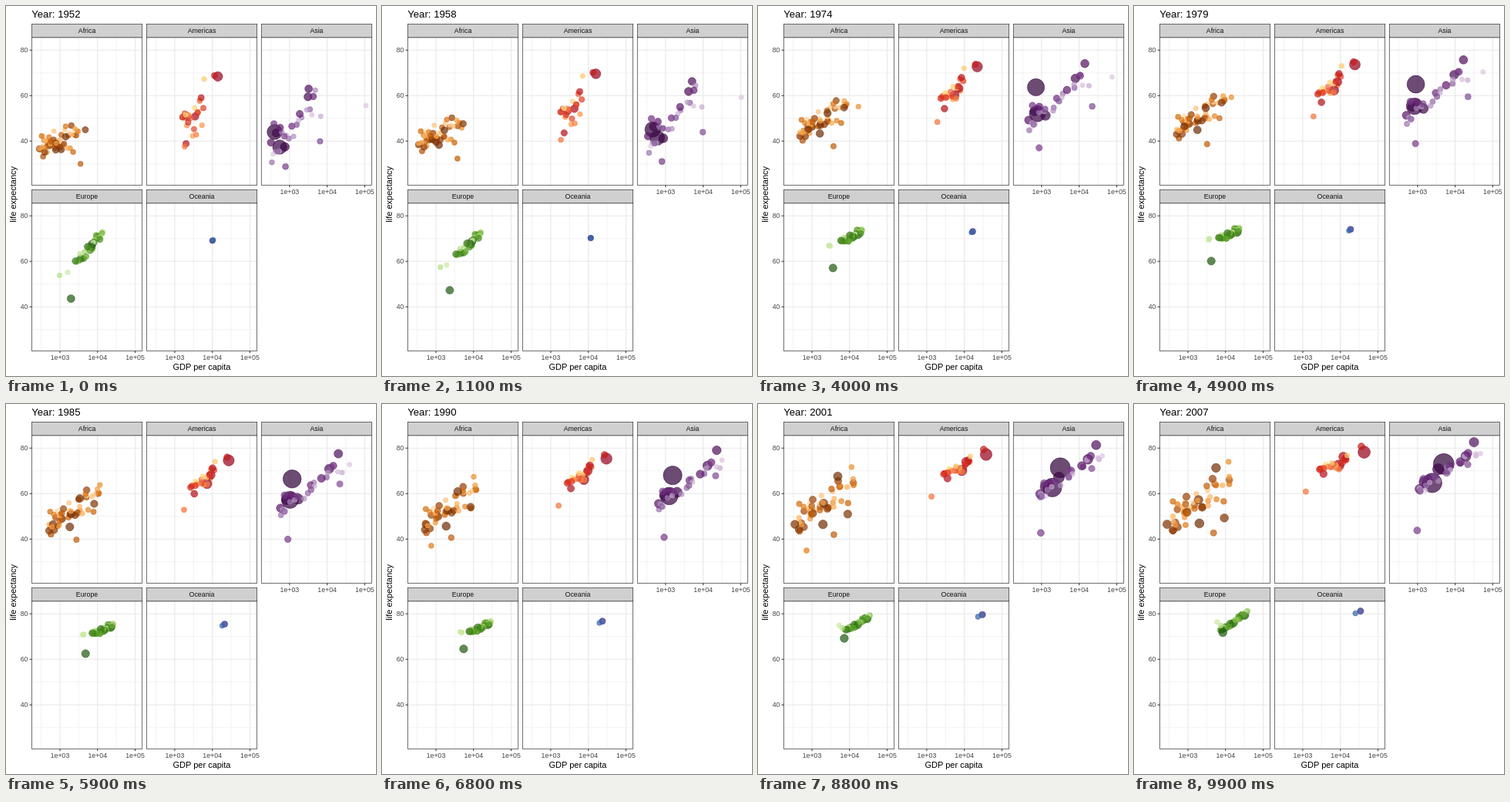
An HTML page for the animation above (10 s loop, 480 by 480 pixels).

```html
<!DOCTYPE html>
<html lang="en">
<head>
<meta charset="utf-8">
<title>Life expectancy and GDP</title>
<style>
  html, body { margin: 0; width: 100%; height: 100%; overflow: hidden; background: #fff; }
  svg { display: block; width: 480px; height: 480px; font-family: "Liberation Sans", Arial, sans-serif; }
</style>
</head>
<body>
<svg id="stage" viewBox="0 0 480 480"></svg>
<script>
const stage = document.getElementById('stage');
const LOOP = 10000, STEP = 100, FIRST = 1952, SPAN = 55;
const LEFT = 33.4, TOP = 40.8, W = 143.3, H = 191.6, DX = 148.95, DY = 215;
const DECADE = 48.75, YEAR = 2.952;
const GRID = '#e7e7e7', EDGE = '#333', STRIP = '#d0d0d0', GAMMA = 1.22;
const dots = [];

function add(tag, attrs, parent = stage) {
  const el = document.createElementNS('http://www.w3.org/2000/svg', tag);
  for (const k in attrs) el.setAttribute(k, attrs[k]);
  parent.appendChild(el);
  return el;
}
function line(x1, y1, x2, y2, stroke, width) {
  add('line', { x1, y1, x2, y2, stroke, 'stroke-width': width });
}
function label(text, x, y, size, fill, anchor = 'middle', more = {}) {
  const el = add('text', { x, y, fill, 'font-size': size, 'text-anchor': anchor, ...more });
  el.textContent = text;
  return el;
}

const mix = (a, b, t) => a + (b - a) * t;
const xPos = (p, logGdp) => p.x + 36.6 + (logGdp - 3) * DECADE;
const yPos = (p, life) => p.y + 16.4 + (80 - life) * YEAR;

// mulberry32
function seeded(s) {
  return () => {
    s = s + 0x6D2B79F5 | 0;
    let t = Math.imul(s ^ s >>> 15, 1 | s);
    t = t + Math.imul(t ^ t >>> 7, 61 | t) ^ t;
    return ((t ^ t >>> 14) >>> 0) / 4294967296;
  };
}
const rnd = seeded(11);

// Colour along a ramp of hex stops, slightly darkened
function shade(ramp, t) {
  const stops = ramp.split(' '), n = stops.length - 1;
  const i = Math.min(n - 1, Math.floor(t * n)), f = t * n - i;
  const part = (hex, k) => parseInt(hex.substr(k * 2, 2), 16) / 255;
  const channel = k => mix(part(stops[i], k), part(stops[i + 1], k), f) ** GAMMA;
  return `rgb(${[0, 1, 2].map(k => Math.round(255 * channel(k)))})`;
}

// Evenly spaced GDP and life stops, straight lines on the log scale
function alongRoute(r) {
  const n = r.length / 2 - 1;
  return u => {
    const i = Math.min(n - 1, Math.floor(u * n)), f = u * n - i, k = i * 2;
    return [mix(Math.log10(r[k]), Math.log10(r[k + 2]), f), mix(r[k + 1], r[k + 3], f)];
  };
}

// A drifting place in a slanted band whose shape bends through three poses
function inCloud(poses, rank, skew) {
  const s0 = ((rank * .618 + .3) % 1) ** skew;
  const s1 = Math.min(1, Math.max(0, s0 + .3 * (rnd() - .5)));
  const off0 = rnd() + rnd() - 1, off1 = mix(off0, rnd() + rnd() - 1, .4);
  return u => {
    const w = [(1 - u) * (1 - 2 * u), 4 * u * (1 - u), u * (2 * u - 1)];
    const [gLow, gHigh, lLow, lHigh, spread] =
      poses[0].map((_, k) => poses.reduce((sum, pose, j) => sum + pose[k] * w[j], 0));
    const s = mix(s0, s1, u);
    return [mix(gLow, gHigh, s), mix(lLow, lHigh, s) + spread * mix(off0, off1, u)];
  };
}

function panel(name, index, axis, o) {
  const p = { x: LEFT + index % 3 * DX, y: TOP + Math.floor(index / 3) * DY };
  const right = p.x + W, bottom = p.y + H;
  const grid = (xs, ys, width) => {
    ys.forEach(v => line(p.x, yPos(p, v), right, yPos(p, v), GRID, width));
    xs.forEach(v => line(xPos(p, v), p.y, xPos(p, v), bottom, GRID, width));
  };
  grid([2.5, 3.5, 4.5], [30, 50, 70], .53);
  grid([3, 4, 5], [40, 60, 80], 1.07);

  // Ranks by population, stacked in a mixed order
  const layer = add('g', {});
  for (let i = 0; i < o.count; i++) {
    const rank = i * 17 % o.count, route = o.routes[rank];
    const color = shade(o.ramp, rank / (o.count - 1));
    const el = add('circle', {
      fill: color, stroke: color, 'fill-opacity': .7, 'stroke-opacity': .7, 'stroke-width': .71
    }, layer);
    const path = route ? alongRoute(route) : inCloud(o.poses, rank, o.skew);
    dots.push({ el, p, path, people: o.people(rank), growth: o.growth });
  }

  const frame = { x: p.x, width: W, stroke: EDGE, 'stroke-width': .7 };
  add('rect', { ...frame, y: p.y, height: H, fill: 'none' });
  add('rect', { ...frame, y: p.y - 17.3, height: 17.3, fill: STRIP });
  label(name, p.x + W / 2, p.y - 5.6, 8.8, '#111');

  if (axis.includes('x')) [3, 4, 5].forEach(v => {
    line(xPos(p, v), bottom, xPos(p, v), bottom + 2.75, EDGE, 1.07);
    label('1e+0' + v, xPos(p, v), bottom + 11.3, 8.8, '#444');
  });
  if (axis.includes('y')) [40, 60, 80].forEach(v => {
    line(p.x - 2.75, yPos(p, v), p.x, yPos(p, v), EDGE, 1.07);
    label(v, p.x - 4.95, yPos(p, v) + 3.1, 8.8, '#444', 'end');
  });
}

// Poses: log GDP low and high, life low and high, spread.
// Routes: the few dots that stand out, by rank.
panel('Africa', 0, 'y', {
  count: 52, ramp: '7f3b08 b35806 e08214 fdb863 fee0b6', skew: 1.4, growth: 3.8,
  people: i => 110 * Math.exp(-.1 * i),
  poses: [[2.45, 3.5, 37, 43, 8], [2.7, 4, 45, 58, 9], [2.6, 4.1, 49, 65, 13]],
  routes: {
    0: [1077, 36.3, 1790, 45, 2014, 46.9],
    1: [1419, 41.9, 3000, 54.7, 5581, 71.3],
    3: [781, 39.1, 800, 46.5, 278, 46.5],
    4: [4725, 45, 7900, 57, 9270, 49.3],
    19: [3521, 30, 4200, 37, 2450, 40.5, 4797, 42.7],
    28: [493, 40, 560, 43.3, 600, 44.7, 865, 45.6, 620, 26, 863, 46.2],
    32: [2388, 42.7, 20000, 52, 10000, 67, 12057, 74]
  }
});

panel('Americas', 1, '', {
  count: 25, ramp: 'a50026 d73027 f46d43 fdae61 fee090', skew: 1, growth: 2.3,
  people: i => [301, 190, 109][i] || 44 * Math.exp(-.15 * (i - 3)),
  poses: [[3.2, 3.85, 45, 59, 13], [3.4, 4.1, 59, 71, 6], [3.45, 4.25, 70, 76, 4]],
  routes: {
    0: [13990, 68.4, 24500, 73.7, 42952, 78.2],
    1: [2109, 50.9, 6850, 62.4, 9066, 72.4],
    2: [3478, 50.8, 8600, 66.2, 11978, 76.2],
    5: [11367, 68.8, 22500, 74.9, 36319, 80.7],
    14: [1840, 37.6, 1930, 51, 1202, 60.9]
  }
});

panel('Asia', 2, 'x', {
  count: 33, ramp: '40004b 762a83 9970ab c2a5cf e7d4e8', skew: 1.2, growth: 2.35,
  people: i => [1319, 1110][i] || 224 * Math.exp(-.19 * (i - 2)),
  poses: [[2.5, 3.85, 39, 59, 10], [2.7, 4.4, 52, 72, 7], [3.05, 4.65, 63, 80, 5]],
  routes: {
    0: [400, 44, 500, 46, 700, 63.6, 1180, 66.5, 2180, 70, 4959, 73],
    1: [547, 37.4, 835, 55.5, 2452, 64.7],
    2: [750, 37.5, 1440, 54.5, 3541, 70.7],
    5: [3217, 63, 12500, 72.8, 22500, 78.8, 31656, 82.6],
    12: [779, 28.8, 880, 39, 975, 43.8],
    14: [6460, 39.9, 22500, 52, 21500, 67.5, 21655, 72.8],
    31: [108382, 55.6, 95000, 66.5, 31000, 74.5, 47307, 77.6]
  }
});

panel('Europe', 3, 'xy', {
  count: 30, ramp: '276419 4d9221 7fbc41 b8e186 e6f5d0', skew: .85, growth: 1.3,
  people: i => 82 * Math.exp(-.14 * i),
  poses: [[3.4, 4.15, 59, 72.5, 2.5], [3.8, 4.42, 70, 74.5, 2], [3.85, 4.6, 72.5, 81, 1.5]],
  routes: {
    0: [7144, 67.5, 20500, 72.8, 32170, 79.4],
    1: [1969, 43.6, 4200, 60.3, 8458, 71.8],
    23: [974, 53.8, 3700, 70, 7446, 74.9],
    26: [1601, 55.2, 3600, 69.5, 5937, 76.4]
  }
});

panel('Oceania', 4, 'x', {
  count: 2, ramp: '313695 4575b4', growth: 2.2,
  people: i => [20.4, 4.1][i],
  routes: {
    0: [10040, 69.1, 18900, 74.1, 34435, 81.2],
    1: [10557, 69.4, 17000, 73.5, 25185, 80.2]
  }
});

label('GDP per capita', 254, 472, 11, '#000');
label('life expectancy', 0, 0, 11, '#000', 'middle', { transform: 'translate(13.3 244.3) rotate(-90)' });
const title = label('', 33.2, 15, 13.2, '#000', 'start');

function draw(u) {
  title.textContent = 'Year: ' + Math.round(FIRST + SPAN * u);
  for (const d of dots) {
    const [gdp, life] = d.path(u);
    const people = d.people * d.growth ** (u - 1);
    const size = 2 + 10 * Math.sqrt(people / 1319);
    d.el.setAttribute('cx', xPos(d.p, gdp).toFixed(2));
    d.el.setAttribute('cy', yPos(d.p, life).toFixed(2));
    d.el.setAttribute('r', (.7 + 1.067 * size).toFixed(2));
  }
}

const start = performance.now();
let shown = -1;
function tick() {
  const step = Math.floor((performance.now() - start) % LOOP / STEP);
  if (step !== shown) draw((shown = step) / (LOOP / STEP - 1));
  requestAnimationFrame(tick);
}
tick();
</script>
</body>
</html>
```
